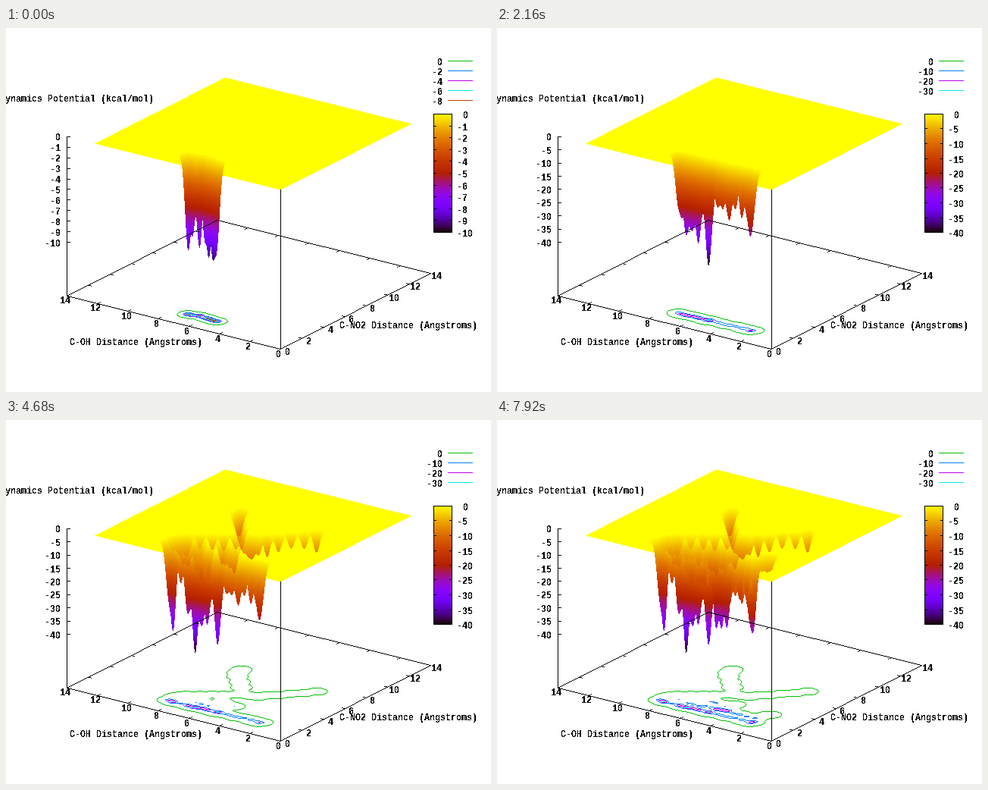
A matplotlib script that plays this animation: 640x480 px, repeating every 8 s.

```python
import numpy as np
import matplotlib.pyplot as plt
from matplotlib.animation import FuncAnimation
from matplotlib.colors import to_rgb

WIDTH, HEIGHT, DPI = 640, 480, 100
STEP_MS, LOOP_MS, INTERVAL = 180, 8000, 20
STEPS = -(-LOOP_MS // STEP_MS)
LIFT, Z_SPAN = 210, 139            # floor to sheet, zero to deepest tick
SIGMA, MAX_DEPTH = 0.165, 39.8     # well width in Angstroms, deepest well

# Corner of the floor and the screen vectors of one Angstrom on each axis
CORNER = np.array([362.0, 423.0])
OH, NO2 = np.array([-282, -70]) / 14, np.array([198, -100]) / 14
TO_DATA = np.linalg.inv(np.column_stack([OH, NO2]))
SHEET = 12.2

CONTOUR_COLORS = ["#00c000", "#0080ff", "#c000ff", "#00eeee", "#c04000"]

# Trails of wells: first step, last step, floor path, count, depth range
TRAILS = [
    (0, 0, [(239, 377), (262, 381), (278, 386)], 7, 6.3, 9),
    (1, 5, [(240, 376), (270, 382.5), (332, 398)], 14, 9, 17),
    (6, 12, [(239, 375.5), (279, 385), (338, 398.5)], 16, 14, 24),
    (13, 18, [(214, 368), (221, 371), (258, 380)], 9, 16, 25),
    (13, 18, [(221, 364), (240, 361.5), (302, 361.5)], 9, 7, 9),
    (19, 24, [(313, 361.5), (335, 364), (409, 358)], 10, 7.5, 11),
    (19, 24, [(311, 352), (303, 334), (311, 328)], 6, 7, 12),
    (19, 24, [(284, 371), (300, 377)], 4, 10, 14),
    (25, 30, [(232, 367), (314, 375)], 11, 9, 14),
    (25, 30, [(250, 373), (306, 382)], 8, 14, 20),
    (31, 36, [(235, 371), (338, 392)], 13, 10, 16),
    (37, 42, [(290, 380), (340, 393)], 6, 14, 20),
    (37, 42, [(343, 391), (362, 388)], 4, 7.5, 8.5),
    (43, 44, [(288, 381), (302, 383)], 3, 32, 38),
]
# The few wells that grow deepest: step, floor x, floor y, depth
DEEP = [(4, 256, 380, 17), (5, 279, 384.5, 20.5), (9, 249, 378.5, 31),
        (10, 265, 381.5, 31), (11, 334, 398.5, 23), (12, 279, 384.5, 39),
        (13, 220, 371.5, 36), (17, 249, 378.5, 37), (41, 338, 397.5, 30)]

xs = np.arange(190, 432)
floor_ys = np.arange(312, 414, 0.25)
screen_ys = np.arange(105, 322)
grid_x, grid_y = np.meshgrid(xs, floor_ys)


def to_data(dx, dy):
    return (TO_DATA[0, 0] * dx + TO_DATA[0, 1] * dy,
            TO_DATA[1, 0] * dx + TO_DATA[1, 1] * dy)


def well(x, y, depth):
    u, v = to_data(grid_x - x, grid_y - y)
    return depth * np.exp(-(u * u + v * v) / (2 * SIGMA ** 2))


def build_depths():
    rng = np.random.default_rng(4)
    due = [[] for _ in range(STEPS)]
    for start, end, path, count, low, high in TRAILS:
        px, py = np.transpose(path)
        along = np.linspace(0, len(path) - 1, count)
        knots = np.arange(len(path))
        for i, t in enumerate(along):
            x = np.interp(t, knots, px) + rng.uniform(-1, 1)
            y = np.interp(t, knots, py) + rng.uniform(-.7, .7)
            step = start + i * (end - start + 1) // count
            due[step].append((x, y, rng.uniform(low, high)))
    for step, *spec in DEEP:
        due[step].append(spec)

    power, states = np.zeros(grid_x.shape), []
    for specs in due:
        for spec in specs:
            power = power + well(*spec) ** 2
        depth = np.sqrt(power)
        states.append(depth * min(1, MAX_DEPTH / depth.max()))
    return states


def palette(t):
    t = np.clip(t, 0, 1)
    return np.stack([np.sqrt(t), t ** 3, np.clip(np.sin(2 * np.pi * t), 0, 1)], -1)


def stroke(canvas, points, color="black"):
    """One pixel wide polyline without smoothing."""
    for (x0, y0), (x1, y1) in zip(points, points[1:]):
        n = int(max(abs(x1 - x0), abs(y1 - y0))) + 1
        cols = np.rint(np.linspace(x0, x1, n)).astype(int)
        rows = np.rint(np.linspace(y0, y1, n)).astype(int)
        canvas[rows, cols] = to_rgb(color)


def draw_contour(canvas, depth, level, color):
    inside = depth[::4] > level
    core = inside.copy()
    core[1:-1, 1:-1] &= (inside[:-2, 1:-1] & inside[2:, 1:-1]
                         & inside[1:-1, :-2] & inside[1:-1, 2:])
    rows, cols = np.nonzero(inside & ~core)
    canvas[rows + int(floor_ys[0]), cols + xs[0]] = to_rgb(color)


def draw_wells(canvas, depth, z_range):
    """Hanging wells, the rear ones painted over those in front."""
    scale = Z_SPAN / z_range
    base = floor_ys - LIFT
    reach = np.maximum.accumulate(base[:, None] + scale * depth, axis=0)
    for col, x in enumerate(xs):
        hit = np.searchsorted(reach[:, col], screen_ys)
        drop = screen_ys - base[np.minimum(hit, len(base) - 1)]
        seen = (hit < len(base)) & (drop > 1)
        canvas[screen_ys[seen], x] = palette(1 - drop[seen] / Z_SPAN)


def floor(u, v):
    return CORNER + u * OH + v * NO2


def draw_frame_lines(canvas):
    stroke(canvas, [floor(0, 0), floor(14, 0), floor(14, 14), floor(0, 14), floor(0, 0)])
    stroke(canvas, [(80, 143), (80, 353)])
    stroke(canvas, [(362, 213), (362, 423)])
    for n in range(2, 14, 2):
        for a, b in [((n, 0), (n, .25)), ((n, 14), (n, 13.75)),
                     ((0, n), (.2, n)), ((14, n), (13.8, n))]:
            stroke(canvas, [floor(*a), floor(*b)])


def z_scale(deepest):
    tick = 1 if deepest <= 10 else 2 if deepest <= 20 else 5
    z_range = tick * int(np.ceil(deepest / tick))
    level_step = 2 if z_range <= 12 else 5 if z_range <= 30 else 10
    return tick, z_range, level_step


plt.rcParams["text.antialiased"] = False
fig = plt.figure(figsize=(WIDTH / DPI, HEIGHT / DPI), dpi=DPI, facecolor="white")
depths = build_depths()

pixel_y, pixel_x = np.mgrid[:HEIGHT, :WIDTH]
sheet_u, sheet_v = to_data(pixel_x - CORNER[0], pixel_y + LIFT - CORNER[1])
on_sheet = (np.minimum(sheet_u, sheet_v) >= 0) & (np.maximum(sheet_u, sheet_v) <= SHEET)
blank = np.ones((HEIGHT, WIDTH, 3))
blank[113:270, 564:589] = palette(np.linspace(1, 0, 157))[:, None]
picture = fig.figimage(blank, origin="upper")


def label(x, y, text, ha="center"):
    return fig.text((x + .5) / WIDTH, 1 - (y + .5) / HEIGHT, text, ha=ha,
                    va="center_baseline", family="Liberation Mono", weight="bold",
                    size=11.67 * 72 / DPI, zorder=3)


for n in range(8):
    label(359 - 40.15 * n, 429 - 10.1 * n, str(2 * n))
    label(371 + 28.15 * n, 426 - 14.3 * n, str(2 * n))
label(195, 92, "Metadynamics Potential (kcal/mol)", "right")
label(84, 413, "C-OH Distance (Angstroms)", "left")
label(439, 391, "C-NO2 Distance (Angstroms)", "left")

live = []
shown = None


def show_step(step):
    depth = depths[step]
    deepest = depth.max()
    tick, z_range, level_step = z_scale(deepest)
    canvas = blank.copy()
    while live:
        live.pop().remove()

    for i, level in enumerate(np.arange(0, deepest, level_step)):
        color = CONTOUR_COLORS[i % len(CONTOUR_COLORS)]
        y = 43 + 13 * i
        draw_contour(canvas, depth, max(level, 0.01), color)
        stroke(canvas, [(583, y), (615, y)], color)
        live.append(label(576, y + 1, str(-int(level)), "right"))

    canvas[on_sheet] = to_rgb("#ffff00")
    draw_wells(canvas, depth, z_range)
    draw_frame_lines(canvas)
    stroke(canvas, [(564, 113), (588, 113), (588, 269), (564, 269), (564, 113)])
    for value in range(0, z_range + 1, tick):
        y, bar_y = 143 + Z_SPAN * value / z_range, 113 + 156 * value / z_range
        live.append(label(72, y + .5, str(-value), "right"))
        live.append(label(595, bar_y + 1, str(-value) if value else " 0", "left"))
        stroke(canvas, [(80, y), (84, y)])
        stroke(canvas, [(564, bar_y), (567, bar_y)])
        stroke(canvas, [(585, bar_y), (588, bar_y)])
    picture.set_data((canvas * 255).astype(np.uint8))


def update(frame):
    global shown
    step = frame * INTERVAL // STEP_MS
    if step != shown:
        show_step(step)
        shown = step
    return []


anim = FuncAnimation(fig, update, frames=LOOP_MS // INTERVAL, interval=INTERVAL,
                     repeat=True, repeat_delay=0, blit=False)
plt.show()
```
